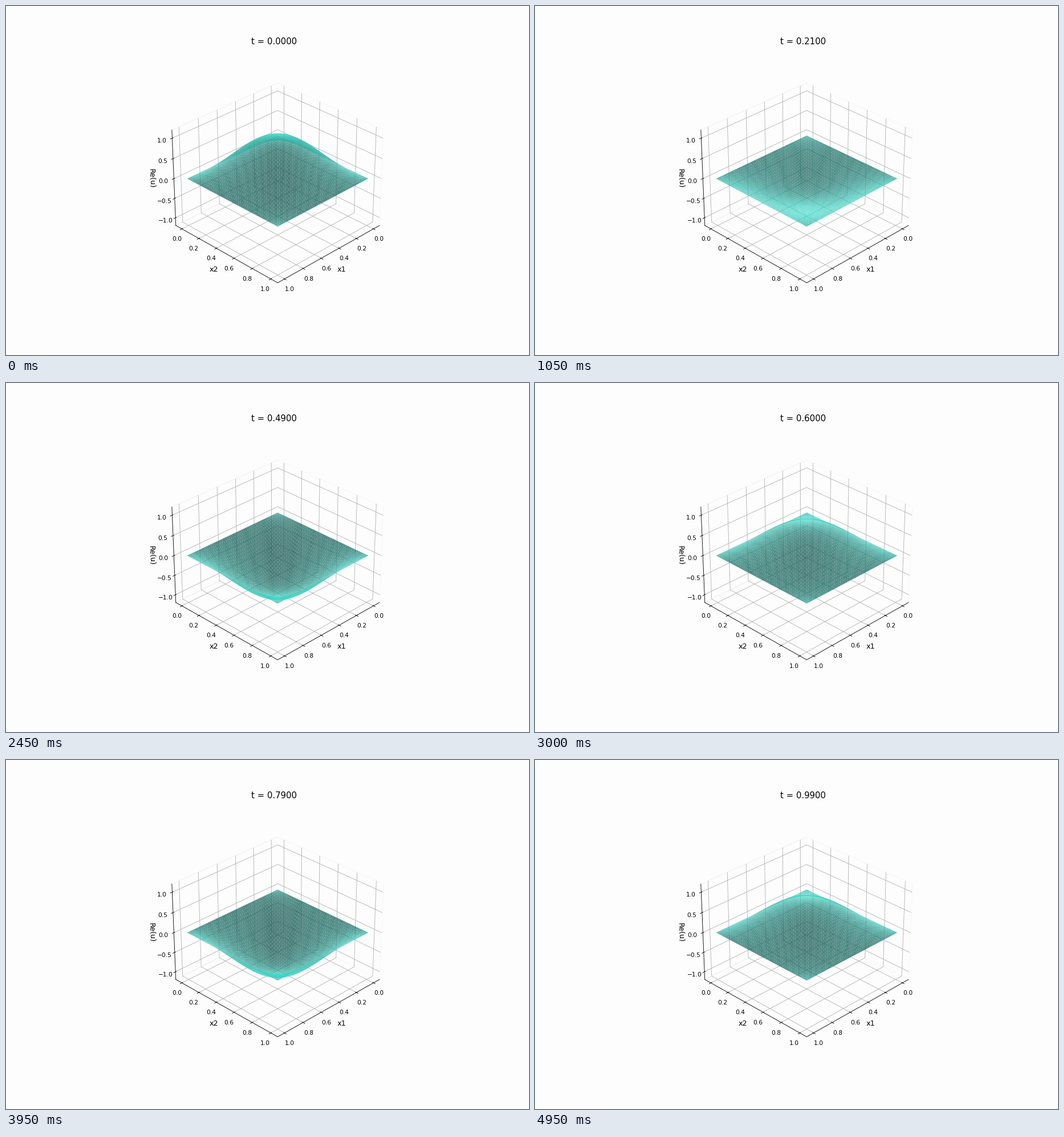
A matplotlib script for the animation above (5000 ms loop, 917x611 px).

```python
import numpy as np
import matplotlib.pyplot as plt
from matplotlib.animation import FuncAnimation

DPI = 76.4
FRAMES, INTERVAL = 100, 50
N = 50                       # mesh cells per side
OMEGA = 2 * np.pi ** 2       # frequency of the lowest mode
BACK = "#fdfdfd"


def unit_square_mesh(n):
    """Grid points and counter-clockwise triangles, split along x = y."""
    s = np.linspace(0, 1, n + 1)
    x, y = (a.ravel() for a in np.meshgrid(s, s))
    i, j = np.meshgrid(np.arange(n), np.arange(n))
    a = (j * (n + 1) + i).ravel()
    b, c, d = a + 1, a + n + 2, a + n + 1
    return x, y, np.vstack([np.c_[a, b, c], np.c_[a, c, d]])


X, Y, TRIANGLES = unit_square_mesh(N)
MODE = np.sin(np.pi * X) * np.sin(np.pi * Y)

fig = plt.figure(figsize=(917.01 / DPI, 611.01 / DPI), dpi=DPI, facecolor=BACK)
ax = fig.add_subplot(projection="3d", facecolor=BACK)
ax.view_init(elev=30, azim=45)
ax.set_box_aspect(None, zoom=0.85)

margin = 0.05 + 1.1 / 48
ax.set_xlim(-margin, 1 + margin)
ax.set_ylim(-margin, 1 + margin)
ax.set_zlim(-1.2, 1.2)
ax.set_zticks(np.linspace(-1, 1, 5))
for axis, name in ((ax.xaxis, "x1"), (ax.yaxis, "x2"), (ax.zaxis, "Re(u)")):
    axis.pane.fill = False
    axis.set_label_text(name, fontsize=12)
title = ax.set_title("", fontsize=14)

surface = None


def draw(frame):
    global surface
    if surface is not None:
        surface.remove()
    t = frame / FRAMES
    surface = ax.plot_trisurf(X, Y, MODE * np.cos(OMEGA * t),
                              triangles=TRIANGLES, color="turquoise",
                              alpha=0.8, linewidth=0)
    title.set_text(f"t = {t:.4f}")


anim = FuncAnimation(fig, draw, frames=FRAMES, init_func=lambda: None,
                     interval=INTERVAL, repeat=True, repeat_delay=0)
plt.show()
```
